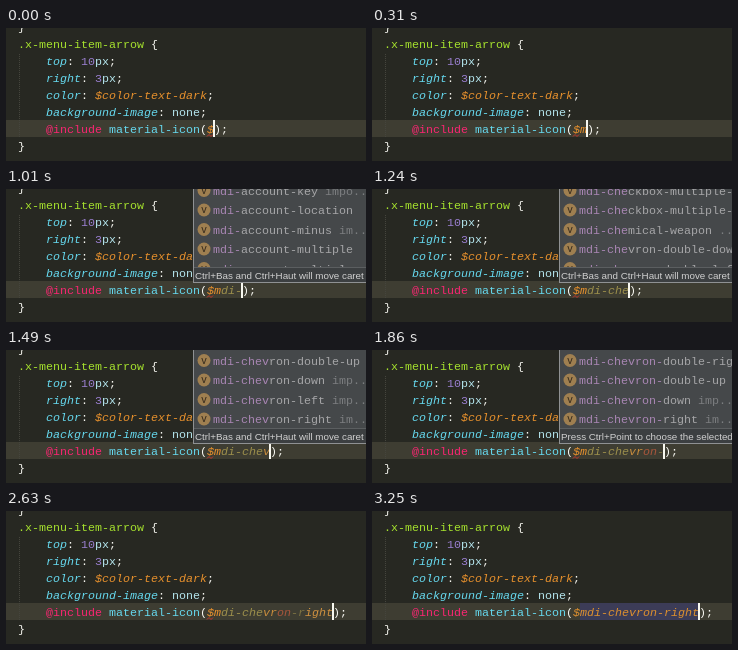
An HTML page that plays this animation: 360 px wide and 133 px high, repeating every 3.79 s.

```html
<!DOCTYPE html>
<html lang="en">
<head>
<meta charset="utf-8">
<title>Code completion</title>
<style>
html, body { margin: 0; width: 100%; height: 100%; overflow: hidden; background: #272822; }
svg { display: block; width: 360px; height: 133px; }
text { white-space: pre; }
.code { font: 11.667px "Liberation Mono", "DejaVu Sans Mono", monospace; }
.hint { font: 9.8px "Liberation Sans", Arial, sans-serif; fill: #d0d0d0; }
.icon { font: 10px "Liberation Mono", monospace; fill: #33291c; text-anchor: middle; }
.em { font-style: italic; }
</style>
</head>
<body>
<svg id="stage" viewBox="0 0 360 133"></svg>
<script>
const LOOP = 3790, CHAR = 7, LINE = 17, ROW = 19.5;
const LEFT = 12, VAR_X = 201, ROW_TOP = 92, BASE = 105;
const WHITE = '#f8f8f2', CYAN = '#66d9ef', GREEN = '#a6e22e', PURPLE = '#9a7fd0';
const ORANGE = '#e8912d', PINK = '#f92672', EDGE = '#8f9193';
const stage = document.getElementById('stage');

const rect = (x, y, w, h, fill) =>
  `<rect x="${x}" y="${y}" width="${w}" height="${h}" fill="${fill}"/>`;
const span = ([text, fill, em]) =>
  `<tspan fill="${fill}"${em ? ' class="em"' : ''}>${text}</tspan>`;
const code = (x, y, parts) =>
  `<text class="code" x="${x}" y="${y}">${parts.map(span).join('')}</text>`;

function wave(x1, x2, color) {
  let d = `M${x1} 108.5`;
  for (let x = x1 + 2, up = true; x <= x2; x += 2, up = !up) d += `L${x} ${up ? 106.5 : 108.5}`;
  return `<path d="${d}" fill="none" stroke="${color}"/>`;
}

// Static source lines
const prop = (name, ...value) => [[name, CYAN, true], [': ', WHITE], ...value, [';', WHITE]];
const pixels = n => [[n, PURPLE], ['px', '#b5e6ee']];
const indent = LEFT + 4 * CHAR;
const backdrop = rect(0, 0, 360, 133, '#272822') + rect(0, ROW_TOP, 360, LINE, '#3e3d32');
const guide = '<path d="M13.5 26V109" stroke="#45453d" stroke-dasharray="1 1"/>';
const source = guide + code(LEFT, 3, [['}', WHITE]]) +
  code(LEFT, 20, [['.x-menu-item-arrow', GREEN], [' {', WHITE]]) +
  [prop('top', ...pixels(10)), prop('right', ...pixels(3)),
   prop('color', ['$color-text-dark', ORANGE, true]),
   prop('background-image', ['none', '#b5e6ee'])]
    .map((parts, i) => code(indent, 37 + i * LINE, parts)).join('') +
  code(indent, BASE, [['@include', PINK], [' material-icon', CYAN], ['(', WHITE]]) +
  code(LEFT, 122, [['}', WHITE]]);

// Typed text over time: [start, text after the dollar sign]
const typing = [
  [0, ''], [310, 'm'], [550, 'md'], [620, 'mdi'], [770, 'mdi-'], [1170, 'mdi-c'],
  [1240, 'mdi-che'], [1490, 'mdi-chev'], [1590, 'mdi-chevr'], [1690, 'mdi-chevro'],
  [1860, 'mdi-chevron-'], [1970, 'mdi-chevron-r'], [2090, 'mdi-chevron-righ'],
  [2240, 'mdi-chevron-right']
];

// Popup over time: [start, centre of first row, names]
const popups = [
  [0, 0, ''],
  [550, 1.5, 'account-location account-minus account-multiple account-multiple-minus account-multiple-outline'],
  [1010, 1.5, 'account-key account-location account-minus account-multiple account-multiple-minus'],
  [1170, 1.5, 'cards-playing-outline cart cart-off cart-outline cart-plus'],
  [1240, 1.5, 'checkbox-multiple-blank checkbox-multiple-marked chemical-weapon chevron-double-down chevron-double-left'],
  [1490, 10.5, 'chevron-double-up chevron-down chevron-left chevron-right'],
  [1860, 10.5, 'chevron-double-right chevron-double-up chevron-down chevron-right'],
  [1970, 48.5, 'chevron-right chevron-double-right'],
  [2630, 0, '']
];

const at = (list, t) => list.filter(item => item[0] <= t).pop();

// Split a name into matched and plain runs
function match(name, typed) {
  const hit = '#a986b4', plain = '#a6a6a8';
  let n = 0;
  while (n < typed.length && name[n] === typed[n]) n++;
  const rest = typed.slice(n), k = rest ? name.indexOf(rest, n) : -1;
  if (k < 0) return [[name.slice(0, n), hit], [name.slice(n), plain]];
  return [[name.slice(0, n), hit], [name.slice(n, k), plain],
          [rest, hit], [name.slice(k + rest.length), plain]];
}

// The import note is cut to the width left beside the name
function note(name) {
  const room = 20 - name.length;
  return room > 0 ? ' import'.slice(0, room) + '...' : '';
}

function popup(t, typed) {
  const [, first, names] = at(popups, t);
  if (!names) return '';
  const top = first > 30 ? 39 : -2;
  let out = rect(187, top, 173, 78 - top, '#45484a');
  if (top > 0) out += rect(187, top, 173, ROW, '#55585a');
  names.split(' ').forEach((item, i) => {
    const y = first + i * ROW, name = 'mdi-' + item;
    out += `<circle cx="198" cy="${y}" r="6.5" fill="#9f7f50"/>` +
      `<text class="icon" x="198" y="${y + 3}">v</text>` +
      code(207, y + 4, [...match(name, typed), [note(name), '#7c7e80']]);
  });
  const hint = t < 1860 ? 'Ctrl+Bas and Ctrl+Haut will move caret'
                        : 'Press Ctrl+Point to choose the selected item';
  out += rect(187, 78, 173, 16, '#3c3f41') + `<text class="hint" x="189" y="90">${hint}</text>`;
  if (top > 0) out += rect(187, top, 173, 1, EDGE);
  return out + rect(187, 78, 173, 1, '#5b5e60') + rect(187, 93, 173, 1, EDGE) +
    rect(187, top, 1, 94 - top, EDGE);
}

// Uneven tint of the name until it resolves
const tints = [['m', ORANGE], ['di-che', '#9c8f4c'], ['vr', '#c98d3d'], ['on', '#a8563c'],
               ['-r', '#7d7242'], ['ight', '#cf9140']];
function variable(t, typed) {
  if (t >= 3110) return [['$' + typed, '#dd902f', true]];
  let pos = 0;
  return [['$', ORANGE, true], ...tints.map(([run, color]) => {
    const text = typed.slice(pos, pos += run.length);
    return [text, color, true];
  })];
}

function draw(t) {
  const typed = at(typing, t)[1];
  const end = VAR_X + CHAR * (typed.length + 1);
  let out = backdrop;
  if (t >= 3110) out += rect(208, ROW_TOP, 118, LINE, '#3c3c57');
  out += source + code(VAR_X, BASE, [...variable(t, typed), [');', WHITE]]);
  if (t < 2950) out += wave(201, 208, '#c8372d');
  if (t >= 3110 && t < 3250) out += wave(208, 326, '#76766c');
  if (t < 150 || t >= 310) out += rect(end - 1, ROW_TOP, 2, LINE, '#f8f8f0');
  stage.innerHTML = out + popup(t, typed);
}

const start = performance.now();
function tick() {
  draw((performance.now() - start) % LOOP);
  requestAnimationFrame(tick);
}
tick();
</script>
</body>
</html>
```
